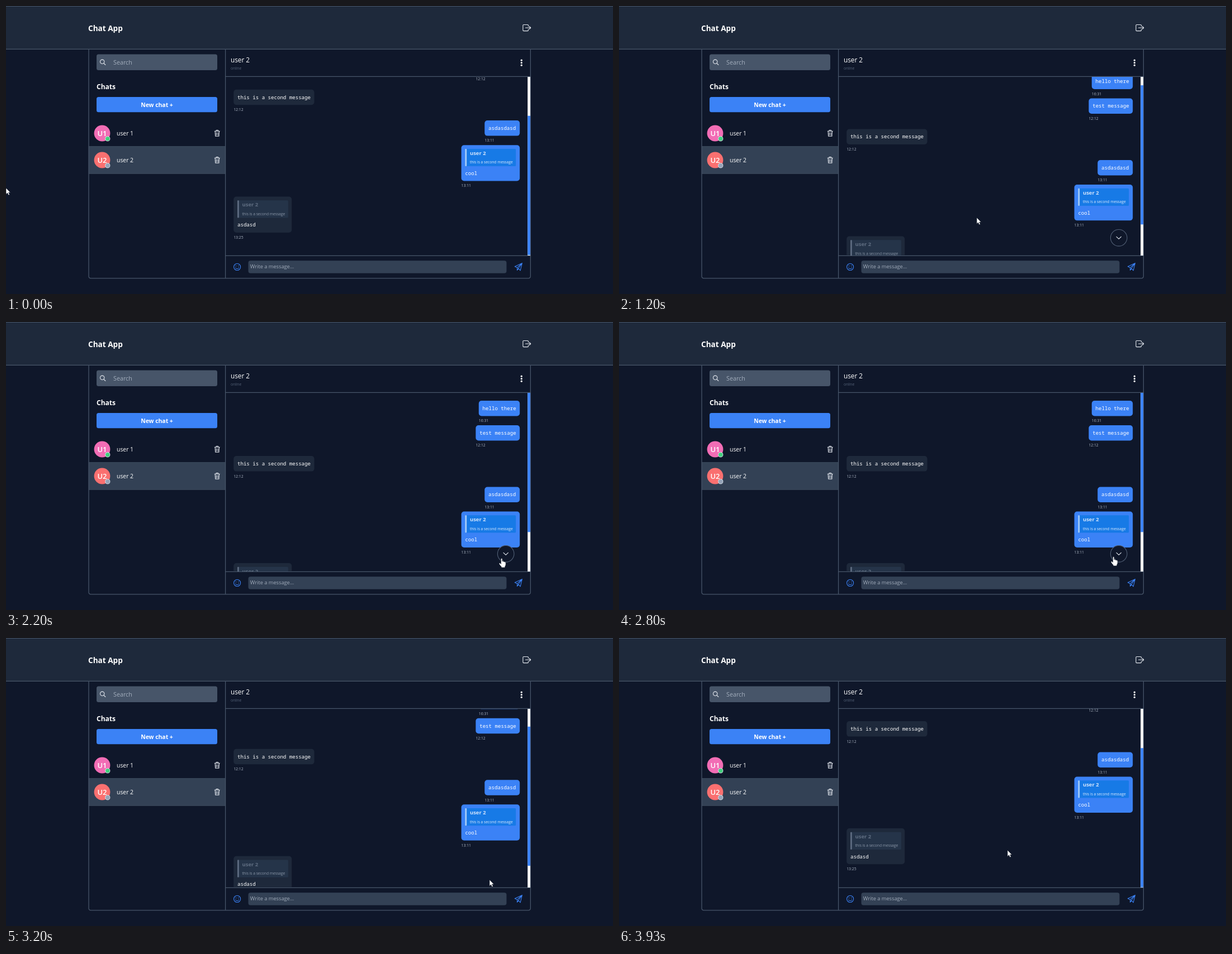
Animation, 1086 px wide and 516 px high, one loop 4.67 s. Source, as an HTML page:

```html
<!DOCTYPE html>
<html lang="en">
<head>
<meta charset="utf-8">
<title>Chat App</title>
<style>
  html, body { margin: 0; width: 100%; height: 100%; overflow: hidden; background: #0f172a; }
  svg { display: block; width: 1086px; height: 516px; }
  text { font-family: "Open Sans", "Noto Sans", sans-serif; fill: #fff; }
  .mono { font-family: "Noto Sans Mono", "DejaVu Sans Mono", monospace; font-size: 9.1px; }
  .bold { font-weight: 700; }
  .semi { font-weight: 600; }
  .time { font-size: 6.8px; fill: #a9b2c0; }
  .quote { font-size: 6.7px; }
  .line { fill: none; stroke: #475569; stroke-width: 1.3; }
  .icon { fill: none; stroke: #e5e9f0; stroke-width: 1.1; stroke-linecap: round; stroke-linejoin: round; }
  .blue { stroke: #3b82f6; }
</style>
</head>
<body>
<svg viewBox="0 0 1086 516">
  <defs>
    <clipPath id="view"><rect x="393" y="127" width="545" height="320"/></clipPath>
    <g id="trash" class="icon">
      <path d="M-4.5-3.7H4.5M-1.7-3.9V-5.5H1.7V-3.9M-3.7-3.5L-3.1 5.3H3.1L3.7-3.5M-1.4-1.3V3.2M1.4-1.3V3.2"/>
    </g>
  </defs>

  <rect width="1086" height="516" fill="#0f172a"/>
  <rect width="1086" height="77" fill="#1e293b"/>
  <path class="line" d="M0 .3H1086M0 77.4H1086"/>
  <text class="bold" x="147" y="45" font-size="13.6">Chat App</text>
  <path class="icon" d="M934.5 36.2V34.8Q934.5 33.5 933.2 33.5H926.2Q924.9 33.5 924.9 34.8V43.3Q924.9 44.6 926.2 44.6H933.2Q934.5 44.6 934.5 43.3V41.9M929.5 39H938.8M936.2 36.4L938.8 39L936.2 41.6"/>

  <g id="side">
    <rect x="162" y="86.5" width="216" height="28.5" rx="3.5" fill="#475569"/>
    <path class="icon" d="M175 102.7L177.8 105.5"/>
    <circle class="icon" cx="172.2" cy="99.8" r="3.7"/>
    <text x="192" y="105" font-size="10.75" style="fill:#a3aebd">Search</text>
    <text class="bold" x="162" y="149.2" font-size="12">Chats</text>
    <rect x="162" y="163" width="216" height="27.3" rx="3.5" fill="#3b82f6"/>
    <text class="bold" x="270" y="180.7" font-size="10.4" text-anchor="middle">New chat +</text>
    <rect x="148" y="251.5" width="244.5" height="49" fill="#334155"/>
    <path d="M148 251.7H392M148 300.2H392" stroke="#3d4a5e" fill="none"/>
  </g>

  <path class="line" d="M148 77.5V484Q148 487.8 152 487.8H934.4Q938.4 487.8 938.4 484V77.5M392.6 77.5V487.8"/>
  <path class="line" d="M393 126.3H938M393 447.3H938"/>
  <text x="402" y="101.2" font-size="11.8">user 2</text>
  <text x="402" y="113.8" font-size="6.6" style="fill:#566479">online</text>
  <g fill="#fff">
    <circle cx="922.3" cy="97.2" r="1.6"/><circle cx="922.3" cy="101.7" r="1.6"/><circle cx="922.3" cy="106.2" r="1.6"/>
  </g>

  <g clip-path="url(#view)">
    <g id="list"></g>
    <rect x="933.2" y="127" width="4.8" height="320" fill="#f3f3f3"/>
    <rect id="thumb" x="933.2" y="127" width="4.8" height="249.3" fill="#3b82f6"/>
  </g>
  <g id="down">
    <circle cx="894.2" cy="415.3" r="14.8" fill="#0f172a" stroke="#536177" stroke-width="1.1"/>
    <path class="icon" d="M890 413.4L894.2 417.4L898.4 413.4"/>
  </g>

  <g class="icon blue">
    <circle cx="413.6" cy="467.5" r="6"/>
    <path d="M410.6 469Q413.6 472.6 416.6 469M411.5 465.3V466M415.7 465.3V466"/>
    <path d="M923.4 460.7L910.3 466.7L914.6 468.8L923.4 460.7L916.6 470.2L920.2 473.8ZM914.6 468.8V473.4L916.6 470.2"/>
  </g>
  <rect x="433.5" y="456.3" width="462" height="22.4" rx="4" fill="#334155"/>
  <text x="436.8" y="470.4" font-size="9.25" style="fill:#a0abba">Write a message...</text>

  <g id="cursor" stroke="#111827" stroke-width=".7" stroke-linejoin="round" fill="#fff">
    <path id="arrow" d="M0 0V11.4L2.6 9L4.4 13L6.5 12.1L4.7 8.2H8Z"/>
    <path id="hand" d="M-1.5 .8Q-1.5-.5-.3-.5Q1 -.5 1 .8V5Q2-.1 3.1 5.4Q4.8 4.2 5.2 6Q7 5.2 7.2 7.2V10.5Q7 12.6 5.8 14V16H-.8V14.5Q-2.8 12.6-4.8 9.3Q-5.2 7.7-3.7 7.8Q-2.6 8.1-1.5 9.6Z"/>
  </g>
</svg>

<script>
const $ = id => document.getElementById(id);
const rect = (x, y, w, h, fill, r = 0) =>
  `<rect x="${x}" y="${y}" width="${w}" height="${h}" rx="${r}" fill="${fill}"/>`;
const label = (x, y, str, cls, fill, size = '') =>
  `<text x="${x}" y="${y}" class="${cls}" style="${fill ? `fill:${fill};` : ''}${size ? `font-size:${size}px` : ''}">${str}</text>`;

const THEMES = {
  mine:   { bg: '#3b82f6', box: '#177ae6', bar: '#a9cdf8', name: '#cfe2fb', note: '#e1edfd' },
  theirs: { bg: '#1e293b', box: '#253449', bar: '#5d6b80', name: '#5f6d81', note: '#8b97a8' }
};

// [left, top, width, text, time, theme, has quote]
const MESSAGES = [
  [845.8, 141, 73.4, 'hello there', '16:31', 'mine'],
  [840.4, 185, 78.8, 'test message', '12:12', 'mine'],
  [407.2, 240.1, 144.3, 'this is a second message', '12:12', 'theirs'],
  [856.3, 295.5, 62.9, 'asdasdasd', '13:11', 'mine'],
  [814.6, 339.6, 104.6, 'cool', '13:11', 'mine', true],
  [407.2, 432, 104, 'asdasd', '13:25', 'theirs', true]
];

function message([x, y, w, text, time, kind, quoted]) {
  const c = THEMES[kind], h = quoted ? 64.3 : 27.5;
  let out = rect(x, y, w, h, c.bg, 5);
  if (quoted) {
    out += rect(x + 6.8, y + 6.7, 90.8, 31.2, c.box, 1.5) + rect(x + 6.8, y + 6.7, 2.8, 31.2, c.bar, 1)
      + label(x + 15.3, y + 17.8, 'user 2', 'bold', c.name, 9.5)
      + label(x + 15.3, y + 33.2, 'this is a second message', 'quote', c.note);
  }
  return out + label(x + 6.8, y + h - 10.6, text, 'mono') + label(x, y + h + 10.9, time, 'time');
}

function contact(y, id, fill, dot) {
  return `<circle cx="172" cy="${y}" r="14.4" fill="${fill}"/>`
    + `<text class="semi" x="172" y="${y + 4.9}" font-size="13" text-anchor="middle">U${id}</text>`
    + `<circle cx="181.8" cy="${y + 9.8}" r="4.1" fill="${dot}" stroke="#dbe3ea" stroke-width="1"/>`
    + label(198, y + 4.4, `user ${id}`, '', '', 10.4)
    + `<use href="#trash" x="377.8" y="${y}"/>`;
}

$('list').innerHTML = MESSAGES.map(message).join('');
$('side').insertAdjacentHTML('beforeend',
  contact(228, 1, '#f26db5', '#3fd07c') + contact(276, 2, '#fa7070', '#94a3b8'));

const LOOP = 4670, TICK = 200 / 3;

// Pointer tip: [tick, x, y]
const PATH = [
  [2, 0, 326], [3, 25, 325], [5, 150, 352], [7, 345, 386], [8, 440, 390], [10, 624, 372],
  [11, 687, 354], [13, 706, 355], [16, 672, 370], [18, 640, 379], [20, 620, 382], [25, 620, 382],
  [26, 630, 380], [29, 745, 396], [31, 832, 418], [33, 887, 424],
  [35, 892, 429], [37, 894, 431], [39, 890, 427], [42, 885, 421], [45, 885, 421],
  [46, 883, 424], [48, 865, 433], [50, 836, 430], [53, 777, 411],
  [56, 711, 383], [58, 690, 375], [59, 695, 380]
];

function pointer(k) {
  const i = PATH.findIndex(p => p[0] >= k);
  if (i === 0) return PATH[0].slice(1);
  if (i < 0) return PATH[PATH.length - 1].slice(1);
  const [a, ax, ay] = PATH[i - 1], [b, bx, by] = PATH[i], p = (k - a) / (b - a);
  return [ax + (bx - ax) * p, ay + (by - ay) * p];
}

function ease(k, from, to) {
  const p = Math.min(1, Math.max(0, (k - from) / (to - from)));
  return p * p * (3 - 2 * p);
}

function draw(ms) {
  const k = Math.floor((ms % LOOP + 4) / TICK);
  const scroll = 90.4 * (1 - ease(k, 11, 21)) + 91 * ease(k, 45, 51.4);
  const [x, y] = pointer(k);
  const hand = k >= 33 && k <= 46;
  $('list').setAttribute('transform', `translate(0 ${-scroll})`);
  $('thumb').setAttribute('y', 127 + scroll * 0.772);
  $('down').style.display = scroll < 40 ? '' : 'none';
  $('cursor').setAttribute('transform', `translate(${x} ${y})`);
  $('arrow').style.display = hand ? 'none' : '';
  $('hand').style.display = hand ? '' : 'none';
}

const start = performance.now();
function loop(now) {
  draw(Math.max(0, now - start));
  requestAnimationFrame(loop);
}
draw(0);
requestAnimationFrame(loop);
</script>
</body>
</html>
```
